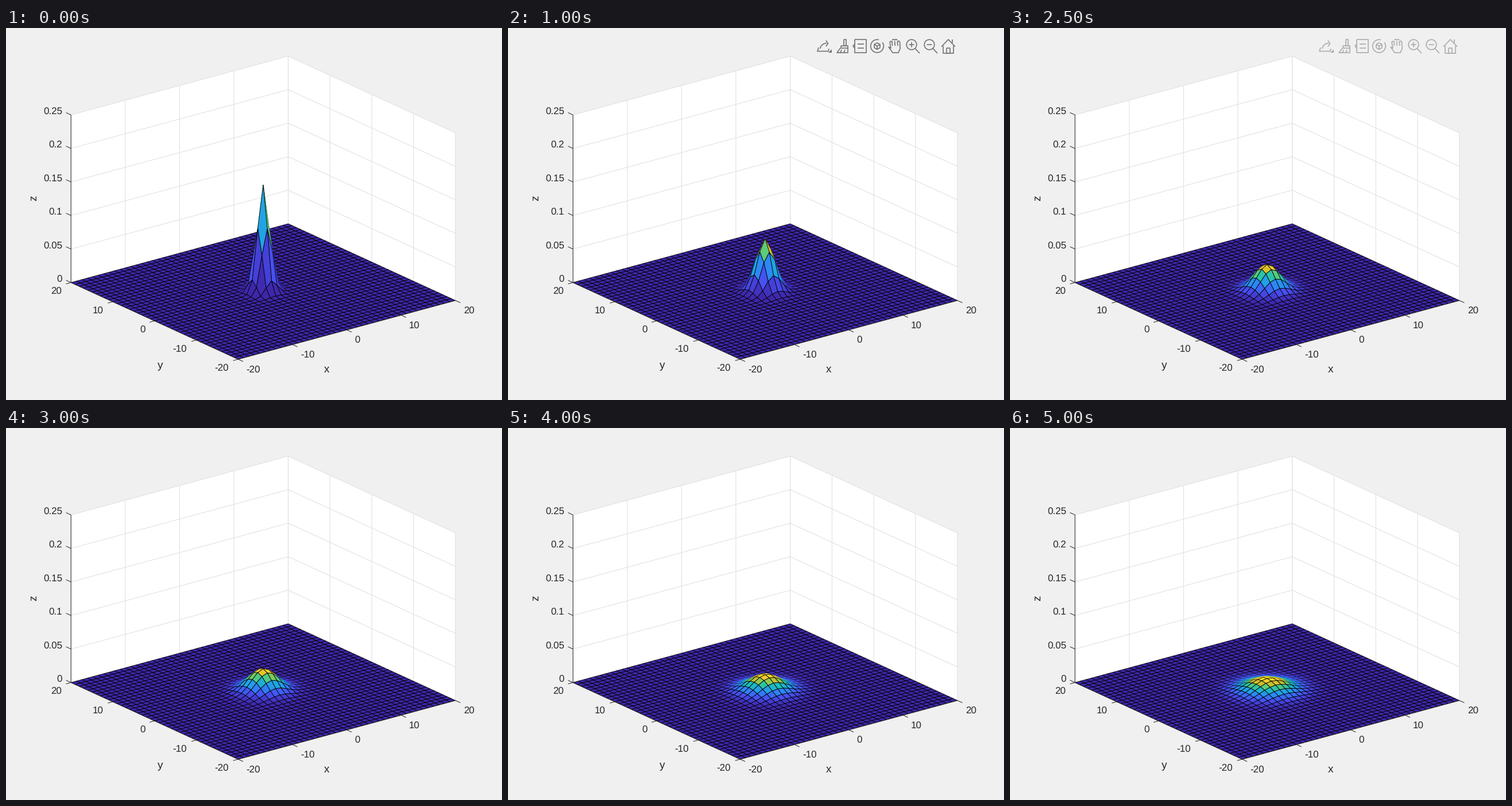
These frames come from a looping animation (864 px wide and 648 px high, 5.5 s). A matplotlib script:

```python
import numpy as np
import matplotlib.pyplot as plt
from matplotlib.animation import FuncAnimation
from matplotlib.collections import PolyCollection
from matplotlib.colors import LinearSegmentedColormap

plt.rcParams.update({"font.family": "Liberation Sans", "text.hinting": "none"})

W, H = 864, 648
INK, GRID = "#262626", "#dfdfdf"
ORIGIN = np.array([448.0, 459.0])
EX = np.array([9.46, -2.56])
EY = np.array([-7.28, -3.34])
EZ = np.array([0.0, -1168.0])
TOP = 0.25

cmap = LinearSegmentedColormap.from_list("density", [
    "#3e26a8", "#484df0", "#327cfc", "#20a5e3", "#19bfb6",
    "#64cd6f", "#d1bf27", "#fdcb32", "#f9fb15"])


def variance(n):
    return 1 + 0.46 * n + 0.026 * n ** 2


def project(x, y, z=0.0):
    x, y, z = np.broadcast_arrays(x, y, z)
    return ORIGIN + x[..., None] * EX + y[..., None] * EY + z[..., None] * EZ


fig = plt.figure(figsize=(W / 72, H / 72), dpi=72, facecolor="#f0f0f0")
ax = fig.add_axes([0, 0, 1, 1])
ax.set_xlim(0, W)
ax.set_ylim(H, 0)
ax.axis("off")


def stroke(pts, color, lw=1.0, z=2):
    p = np.asarray(pts, float)
    return ax.plot(p[:, 0], p[:, 1], color=color, lw=lw, zorder=z, snap=False,
                   solid_capstyle="butt", solid_joinstyle="round")[0]


def segment(a, b, color, z=2):
    stroke([project(*a), project(*b)], color, 1, z)


def label(x, y, s, ha="right", size=17):
    ax.text(x, y, s, ha=ha, va="baseline", fontsize=size, color=INK)


def draw_box():
    for far in ((-20, 20), (20, -20)):
        wall = [project(*far), project(*far, TOP),
                project(20, 20, TOP), project(20, 20)]
        ax.fill(*np.transpose(wall), color="white", lw=0, zorder=1)
    for v in range(-20, 21, 10):
        segment((v, 20, 0), (v, 20, TOP), GRID)
        segment((20, v, 0), (20, v, TOP), GRID)
    for h in np.linspace(0.05, TOP, 5):
        segment((-20, 20, h), (20, 20, h), GRID)
        segment((20, 20, h), (20, -20, h), GRID)


def draw_axes():
    for end in ((-20, 20, TOP), (-20, -20, 0)):
        segment((-20, 20, 0), end, INK, 4)
    segment((-20, -20, 0), (20, -20, 0), INK, 4)
    tick_x = 9 * EX / np.hypot(*EX)
    tick_y = 9.5 * EY / np.hypot(*EY)
    for h in np.linspace(0, TOP, 6):
        p = project(-20, 20, h)
        stroke([p, p + tick_y], INK, 1, 4)
        label(98, p[1] - 0.6, f"{h:.2g}")
    for v in range(-20, 21, 10):
        p = project(v, -20)
        stroke([p, p - tick_y], INK, 1, 4)
        label(p[0] + 14, p[1] + 23.5, v, "left")
        p = project(-20, v)
        stroke([p, p - tick_x], INK, 1, 4)
        label(p[0] - 16.5, p[1] + 20.8, v)
    label(559, 600, "x", "center", 19)
    label(269, 592, "y", "center", 19)
    ax.text(48.5, 296, "z", rotation=90, ha="center", va="center",
            fontsize=19, color=INK)


def arc(cx, cy, r, start=0, stop=360, n=40):
    a = np.radians(np.linspace(start, stop, n))
    return np.column_stack([cx + r * np.cos(a), cy + r * np.sin(a)])


def rect(x0, y0, x1, y1):
    return [(x0, y0), (x1, y0), (x1, y1), (x0, y1), (x0, y0)]


def draw_toolbar():
    # share: tray, curved arrow, menu corner
    paths = [[(541, 34), (539, 40.5), (558, 40.5), (559, 36)],
             arc(555, 38, 11.5, 190, 270), arc(552, 27, 5.5, -70, 70, 3)]
    # brush
    paths += [rect(585, 20, 589, 31), rect(580, 31, 592, 35),
              [(579, 35), (573, 43), (592, 43), (592, 35)]]
    paths += [[(x, 43), (x + 2, 38)] for x in (579, 585)]
    # note
    paths += [rect(604, 20, 624, 43), [(604, 28), (601, 31.5), (604, 35)]]
    paths += [[(609, y), (620, y)] for y in (28, 35)]
    # turning cube
    paths += [arc(643, 31.5, 11.3, -35, 285), arc(643, 31.5, 5.8, 30, 390, 7)]
    paths += [[(643, 31.5), p] for p in arc(643, 31.5, 5.8, 90, 330, 3)]
    # hand: finger tips over a palm
    paths += [arc(x, y, 1.8, 180, 360) for x, y in
              ((667, 25), (671.5, 21.5), (676, 21.5), (680.5, 24.5))]
    paths += [[(x, 23), (x + 0.5, 31)] for x in (669, 673.7, 678.3)]
    paths += [[(665, 25), (667, 35), (663, 33), (670, 43), (680, 43),
               (683, 36), (682.5, 24)]]
    # magnifiers
    for cx in (703, 734):
        paths += [arc(cx, 29, 8.8), [(cx + 6, 35.5), (cx + 14, 44)],
                  [(cx - 4.5, 29), (cx + 4.5, 29)]]
    paths += [[(703, 24.5), (703, 33.5)]]
    # house
    paths += [[(755, 32.5), (767, 20), (779, 32.5)],
              [(758, 31), (758, 44), (776, 44), (776, 31)],
              rect(764, 35, 770, 44), [(774, 26), (774, 20)]]
    icons = [stroke(p, INK, 1.7, 5) for p in paths]
    return icons + ax.fill([557.5, 563.5, 563.5], [42.5, 42.5, 37],
                           lw=0, zorder=5)


# Unit grid; cells are painted from far to near
X, Y = np.meshgrid(np.arange(-20, 21), np.arange(-20, 21))
R2 = X ** 2 + Y ** 2
row, col = (a.ravel() for a in np.mgrid[0:40, 0:40])
order = np.argsort(-(0.609 * col + 0.793 * row))
row, col = row[order], col[order]

draw_box()
surface = PolyCollection([], linewidths=0.85, zorder=3)
surface.set_joinstyle("bevel")
ax.add_collection(surface, autolim=False)
draw_axes()
toolbar = draw_toolbar()


def thickness(cells):
    d1 = cells[:, 2] - cells[:, 0]
    d2 = cells[:, 3] - cells[:, 1]
    area = abs(d1[:, 0] * d2[:, 1] - d1[:, 1] * d2[:, 0]) / 2
    return area / np.maximum(np.hypot(*d1.T), np.hypot(*d2.T))


FLAT = thickness(np.array([[(0, 0), EX, EX + EY, EY]]))[0]


def update(n):
    s = variance(n)
    shape = np.exp(-R2 / (2 * s))
    P = project(X, Y, shape / (2 * np.pi * s))
    cells = np.stack([P[row, col], P[row, col + 1],
                      P[row + 1, col + 1], P[row + 1, col]], axis=1)
    faces = cmap(shape[row, col])
    # outlines of cells seen edge-on fade into the face colour
    edges = faces.copy()
    edges[:, :3] *= 1 - np.clip(thickness(cells) / FLAT, 0, 1)[:, None] ** 2
    surface.set_verts(cells)
    surface.set_facecolor(faces)
    surface.set_edgecolor(edges)
    for icon in toolbar:
        icon.set_visible(2 <= n <= 5)
        icon.set_color("#adadad" if n == 5 else "#757575")
    return [surface, *toolbar]


anim = FuncAnimation(fig, update, frames=11, interval=500, repeat=True,
                     repeat_delay=0, blit=False)
plt.show()
```
